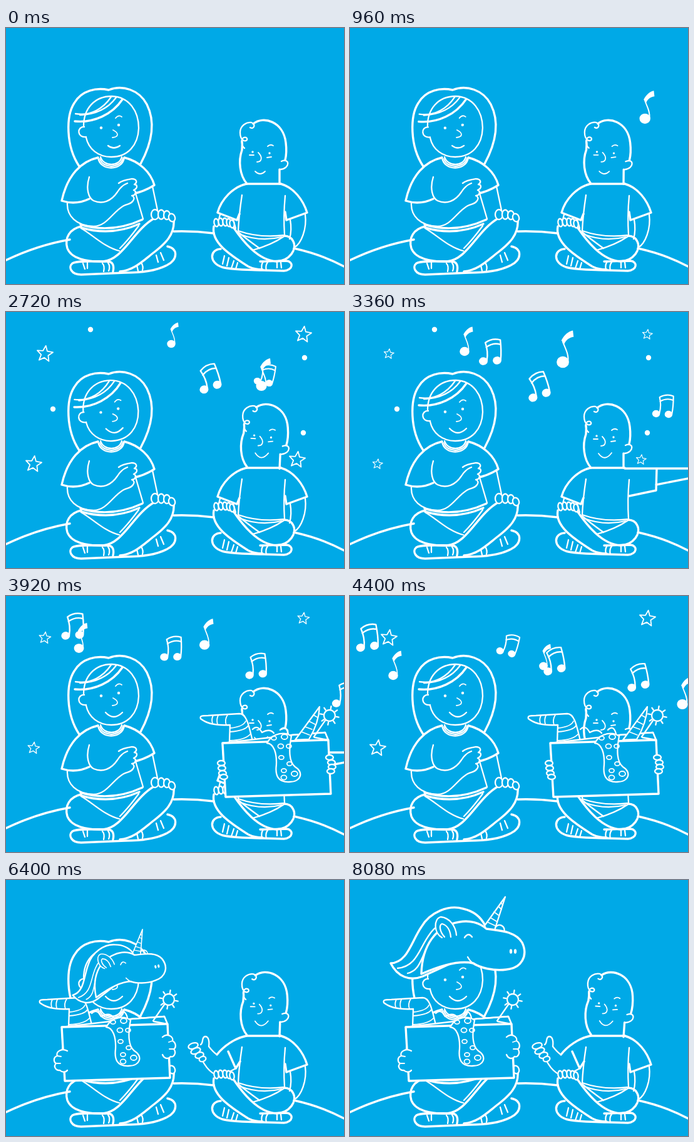
These frames come from a looping animation (540x409 px, 9600 ms). An HTML page:

```html
<!DOCTYPE html>
<html lang="en">
<head>
<meta charset="utf-8">
<title>Dress-up box</title>
<style>
html, body { margin: 0; width: 100%; height: 100%; overflow: hidden; background: #00a9e7; }
svg { display: block; width: 540px; height: 409px; fill: none; stroke: #fff; stroke-width: 2.3; stroke-linecap: round; stroke-linejoin: round; }
.w { stroke-width: 3.4; }
.t { stroke-width: 1.8; }
.s { fill: #fff; stroke: none; }
.b { fill: #00a9e7; }
</style>
</head>
<body>
<svg id="stage" viewBox="0 0 540 409"></svg>
<script>
const path = (d, c = '') => `<path class="${c}" d="${d}"/>`;
const oval = (x, y, rx, ry = rx, c = '', a = 0) =>
  `<ellipse class="${c}" cx="${x}" cy="${y}" rx="${rx}" ry="${ry}" transform="rotate(${a} ${x} ${y})"/>`;
const group = (id, ...parts) => `<g id="${id}">${parts.join('')}</g>`;

const ground = path('M0 371Q50 347 102 338M268 325Q300 324 332 328M460 352Q505 362 540 381', 'w');

const momBody = [
  path('M147 207C120 213 98 235 89 276C104 281 120 279 133 273M189 207C213 213 231 230 237 251Q223 260 207 264', 'w'),
  path('M147 207C150 229 186 229 189 207M151 206C156 222 181 222 185 206'),
  path('M150 209C155 225 182 225 187 208'),
  path('M133 238C127 257 132 272 140 276C154 282 168 277 178 262C183 254 188 250 194 248'),
  path('M98 280C97 300 112 316 140 317C162 316 170 294 188 284C196 280 199 282 203 276C206 272 204 269 201 268C208 267 209 261 204 259C211 256 210 250 205 250C211 246 208 241 201 241C194 242 186 243 180 248'),
  path('M234 253L242 291M207 264L219 305'),
  path('M119 314Q168 329 218 306M120 319Q168 333 213 313', 'w')
].join('');

const momLegs = [
  path('M120 317C102 321 93 335 98 352C104 368 128 374 155 373C188 370 203 323 237 304', 'w'),
  path('M120 320C138 330 158 351 181 356M212 316Q196 338 182 352'),
  path('M268 306C270 330 254 345 237 358C220 371 205 387 182 389', 'w'),
  path('M258 349C275 352 275 370 257 379C238 389 214 391 190 391L120 394C104 394 99 382 106 376C114 371 142 373 164 373Q174 375 171 389', 'w'),
  path('M123 376L126 385M130 375L130 384M154 376Q158 380 156 389M163 375Q167 381 164 388M209 379L211 388M216 375Q220 381 218 387M240 363L243 374M247 359L252 371'),
  oval(238, 298, 6, 8, 'b'), oval(248, 298, 5, 7.5, 'b'), oval(257, 299, 5, 7, 'b'), oval(265, 303, 5, 6.5, 'b', -20)
].join('');

const momHair = path('M117 221C95 188 96 140 109 120C121 99 145 95 164 99C186 90 213 99 225 122C239 150 234 182 215 217', 'w');

const momHead = group('momHead',
  path('M124 157C124 128 142 109 169 109C197 110 212 133 212 160C211 187 195 206 168 206C148 206 132 194 128 175'),
  path('M125 158C113 157 113 176 128 174'),
  group('bangs', path('M111 137C136 141 156 128 168 110M118 139C147 138 165 126 176 111'),
    path('M110 149C140 152 170 138 186 114', 'w')),
  path('M175 144Q180 138 185 142M171 163C181 168 180 174 170 175', 't'),
  group('momEyes', oval(152, 159.5, 2.2, 2.2, 's'), oval(180, 155, 2.2, 2.2, 's')),
  '<path id="momMouth"/>');

const kidHead = group('kidHead',
  path('M390 159C396 163 400 153 392 151C384 150 374 156 374 167C374 173 376 178 380 180C387 182 387 173 380 175C374 178 377 189 381 192'),
  path('M395 153C411 140 443 149 447 183Q449 199 446 211', 'w'),
  path('M440 213C453 207 455 224 438 226'),
  path('M437 226L437 249M377 181C378 187 377 190 377 195C371 212 373 235 385 249', 'w'),
  path('M418 189Q422 185 427 188M403 199C411 207 408 214 401 214M389 203L396 203M417 207L424 206', 't'),
  group('kidEyes', oval(394, 198, 1.7, 1.7, 's'), oval(421, 200, 1.7, 1.7, 's')),
  '<path id="kidMouth" class="t"/>');

const kidBody = path('M384 249L439 249', 'w') +
  path('M377 267Q372 300 371 324M446 268Q443 300 445 331M371 324Q405 336 445 331M375 330Q406 342 440 334');

const kidArms =
  group('leftDown', path('M384 249C363 254 344 273 338 295L369 307L373 297', 'w'), path('M342 298L340 306M363 306L367 320')) +
  group('rightDown', path('M439 249C460 255 475 275 481 295L448 307L446 294', 'w'),
    path('M478 298C481 320 472 345 460 351M454 306Q457 323 453 337')) +
  group('rightOut', path('M439 250L545 250M490 250L489 285L446 294M489 276L545 265', 'w')) +
  group('leftThumb',
    path('M384 249C365 253 347 266 337 279M355 274L367 301L374 290', 'w'),
    path('M337 279Q331 275 324 266C325 258 324 250 318 250C312 251 316 260 311 263M313 287C322 305 336 317 350 310L367 301'),
    oval(299, 265, 8, 4.5, 'b', -18), oval(303, 273, 8, 4.5, 'b', -22), oval(309, 280, 7, 4.5, 'b', -20), oval(314, 286, 5.5, 4, 'b', -20));

const kidLegs = [
  path('M332 317C327 342 357 362 387 381Q397 386 410 386M363 318C378 340 402 371 432 373C454 372 465 353 459 341C456 334 450 332 444 332', 'w'),
  path('M444 333C428 344 412 350 394 355M371 326Q384 337 405 352'),
  path('M343 353C325 354 324 375 345 382C363 387 388 386 410 387L444 388C459 387 460 373 448 372C436 372 424 373 406 373', 'w'),
  path('M349 364L346 377M356 367L353 380M364 372L360 384M370 375L367 385M411 373Q407 379 409 386M418 374Q414 380 416 387M433 375L433 383M439 374L440 383'),
  ...[[336, 311], [343, 310], [350, 310], [356, 311], [361, 313]].map(([x, y]) => oval(x, y, 3.6, 6.3, 'b', -8))
].join('');

// Box and its contents, placed on the woman's lap
const rays = Array.from({ length: 8 }, (_, i) => `<path d="M11 0L15 0" transform="rotate(${i * 45 + 10})"/>`).join('');
const sockDots = [[171, 227, 4], [188, 225, 5], [182, 240, 4.5], [195, 240, 4], [183, 258, 4], [196, 268, 4], [187, 279, 4], [187, 290, 4.5], [204, 284, 5]];
const box = group('box',
  path('M100 235L101 206C84 207 65 205 54 196C52 191 58 191 66 191L116 188C129 188 132 213 138 235Z', 'b'),
  path('M74 191Q71 197 73 203M82 191Q79 197 81 205M97 190Q92 198 95 206M101 211Q122 209 126 200M101 217Q126 215 130 207M101 231Q126 230 134 220', 't'),
  path('M89 235L200 222L253 218L258 230L262 316L94 321Z', 'b'),
  path('M137 213Q145 205 152 218Q165 211 171 219M181 214Q190 205 194 220M200 222L253 218L258 230L236 226'),
  group('boxHorn', path('M205 230L244 177Q243 203 227 229Z', 'b'), path('M215 217L228 222M221 209L232 213M227 200L237 205M234 190L241 194', 't')),
  path('M253 199L235 225'),
  `<g transform="translate(260 191)">${oval(0, 0, 9, 9, 'b')}${rays}</g>`,
  path('M89 235L258 230L262 316L94 321Z', 'b w'),
  path('M160 235C170 217 190 217 199 224C195 245 195 265 205 273C219 281 215 297 196 297C177 298 173 286 175 270C176 251 171 236 160 235Z', 'b'),
  `<g class="t">${sockDots.map(([x, y, r]) => oval(x, y, r, r * .8)).join('')}</g>`,
  group('momHands',
    path('M98 273C88 268 79 275 82 281C75 283 76 291 80 293C75 298 80 305 86 304C90 308 96 307 98 304', 'b'),
    path('M250 251C257 244 268 250 266 257C272 260 272 268 268 270C273 276 268 284 263 282C258 288 252 284 250 279', 'b'),
    path('M82 281L88 282M80 293L87 293M266 257L260 259M268 270L261 270', 't')),
  group('kidHands', ...[[87, 267], [88, 275], [89, 283], [91, 289], [260, 258], [263, 266], [264, 273], [262, 280]]
    .map(([x, y]) => oval(x, y, 6, 4, 'b'))));

const hat = group('hat',
  path('M65 133C92 132 98 98 114 75C128 51 158 39 181 46C199 50 210 61 216 73L190 120L116 154C96 162 76 155 65 133Z', 'b w'),
  path('M76 141C107 138 110 110 127 87Q133 78 141 73M92 149C110 145 113 128 122 110'),
  path('M215 73L248 27L231 80', 'b'),
  path('M219 67L232 73M224 60L234 66M230 51L237 56M237 42L242 47M241 36L244 40', 't'),
  path('M232 76C237 67 250 74 246 84C241 91 233 86 237 81'),
  path('M114 150C115 105 137 73 175 67C191 64 207 68 218 78C237 81 264 81 275 100C285 121 274 141 250 143C230 146 207 140 197 133C170 127 135 141 114 150Z', 'b w'),
  path('M147 92C134 85 133 62 145 59C159 60 169 74 170 88M151 91C143 82 142 72 147 70C155 72 160 80 161 91', 'b'),
  path('M183 92Q189 83 195 91M188 123Q193 132 201 136'),
  oval(257, 114, 2.2, 3.8, 's'), oval(264, 114, 2.2, 3.8, 's'));

const starPath = 'M' + Array.from({ length: 10 }, (_, i) => {
  const a = i * Math.PI / 5 - 1.45, r = i % 2 ? 5.8 : 13;
  return `${(r * Math.cos(a)).toFixed(1)} ${(r * Math.sin(a)).toFixed(1)}`;
}).join('L') + 'Z';
const starSpots = [[62, 67], [475, 36], [44, 243], [465, 236]];
const dotSpots = [[135, 28], [477, 73], [75, 155], [475, 193]];
const singleNote = oval(0, 0, 8.6, 8, 's') + path('M7 0C9 -10 3 -20 0 -28', 't') +
  path('M-2 -30C2 -38 8 -43 14 -44L15 -35C8 -34 4 -30 2 -25Z', 's');
const pairNote = oval(-10.5, 0, 6.6, 6, 's') + oval(10.5, 0, 6.6, 6, 's') +
  path('M-5 -1Q-2 -14 -6 -28Q5 -35 17 -31Q18 -14 16 -1M-5 -21Q6 -28 17 -24');

// Each stop: time, x, y, size, turn
const notes = [
  [singleNote, [[320, 552, 180, 1, 0], [1600, 392, 110, 1, 0], [2720, 264, 51, .78, 0], [3360, 183, 63, .9, 0], [4400, 69, 127, .9, 0], [5040, 51, 311, .78, 0], [5360, 49, 345, .3, 0]]],
  [pairNote, [[1040, 565, 190, .9, 8], [1600, 494, 161, .93, 8], [2720, 327, 120, 1.07, -20], [3360, 224, 78, 1.05, -3], [4400, 28, 81, 1.07, -8], [5040, 68, 249, 1.05, -20], [5360, 75, 290, .3, -20]]],
  [singleNote, [[1280, 565, 200, 1, 0], [1600, 528, 182, 1, 0], [2720, 408, 118, 1, 0], [3360, 340, 80, 1.15, 0], [4400, 309, 112, .8, 0], [5040, 322, 312, 1, 0], [5360, 325, 350, .3, 0]]],
  [pairNote, [[1760, 565, 175, .9, 10], [2720, 411, 112, .9, 10], [3360, 303, 133, 1.08, -20], [4400, 249, 90, .92, 14], [5040, 280, 256, 1, -15], [5360, 290, 300, .3, -15]]],
  [pairNote, [[2960, 565, 185, .9, 5], [3360, 499, 163, .95, 3], [4400, 327, 118, 1.05, -13], [5040, 302, 247, 1, -12], [5360, 300, 300, .3, -12]]],
  [pairNote, [[3760, 565, 185, 1, 5], [4400, 461, 144, 1.05, -13], [4960, 390, 235, .3, -13]]],
  [singleNote, [[4160, 560, 185, 1, 0], [4400, 531, 173, 1, 0], [5040, 496, 288, .7, 0], [5360, 490, 330, .3, 0]]]
];

document.getElementById('stage').innerHTML = [
  ground,
  group('stars', ...starSpots.map(() => path(starPath, 't'))),
  group('dots', ...dotSpots.map(() => oval(0, 0, 4.2, 4.2, 's'))),
  group('notes', ...notes.map(([shape]) => `<g>${shape}</g>`)),
  momHair, momBody, momLegs, momHead, kidBody, kidArms, kidLegs, kidHead, box, hat
].join('');

const el = {};
document.querySelectorAll('[id]').forEach(e => el[e.id] = e);
const show = (e, on) => e.style.display = on ? '' : 'none';
const move = (e, v) => e.setAttribute('transform', v);
const clamp = v => Math.max(0, Math.min(1, v));
const span = (t, a, b) => clamp((t - a) / (b - a));
const ease = p => p * p * (3 - 2 * p);

// Smooth curve through unevenly timed stops
function along(stops, t) {
  let i = 0;
  while (i < stops.length - 2 && t > stops[i + 1][0]) i++;
  const a = stops[i], b = stops[i + 1], d = b[0] - a[0], p = (t - a[0]) / d;
  const slope = (j, k) => {
    const u = stops[Math.max(0, j - 1)], v = stops[Math.min(stops.length - 1, j + 1)];
    return (v[k] - u[k]) / (v[0] - u[0]) * d;
  };
  const q = p * p, c = q * p;
  return [1, 2, 3, 4].map(k => a[k] * (2 * c - 3 * q + 1) + b[k] * (3 * q - 2 * c) +
    slope(i, k) * (c - 2 * q + p) + slope(i + 1, k) * (c - q));
}

function place(list, spots, scale, on) {
  show(list, on);
  spots.forEach(([x, y], i) => move(list.children[i], `translate(${x} ${y}) scale(${scale})`));
}

function blink(e, y, shut) {
  move(e, `translate(0 ${y}) scale(1 ${shut}) translate(0 ${-y})`);
}

function draw(t) {
  notes.forEach(([, stops], i) => {
    const e = el.notes.children[i], on = t >= stops[0][0] && t < stops[stops.length - 1][0];
    show(e, on);
    if (!on) return;
    const [x, y, s, r] = along(stops, t);
    move(e, `translate(${x} ${y}) rotate(${r}) scale(${s})`);
  });

  const pulse = .8 + .22 * Math.cos((t - 1040) / 1680 * 2 * Math.PI);
  place(el.stars, starSpots, pulse, t >= 1120 && t < 4960);
  place(el.dots, dotSpots, Math.min(span(t, 2080, 2320), 1 - span(t, 3680, 3920)), t > 2080 && t < 3920);

  const sway = t < 3360 ? (1 - Math.cos(t / 1120 * 2 * Math.PI)) / 2 : 0;
  const lean = t < 3360 ? 3 * sway : 4 * ease(span(t, 6160, 6640));
  move(el.momHead, `translate(${1.5 * sway} 0) rotate(${-3 * sway} 168 200)`);
  move(el.kidHead, `rotate(${lean} 412 250)`);

  const smile = span(t, 1600, 2720);
  el.momMouth.setAttribute('d', `M${163 - 4 * smile} ${188 - 2 * smile}Q172 ${195 + 5 * smile} ${182 + 4 * smile} ${188 - 2 * smile}`);
  el.kidMouth.setAttribute('d', `M${398 - smile} ${229 - 3 * smile}Q${406 + smile} ${237 + 3 * smile} ${414 + 4 * smile} ${229 - 4 * smile}`);

  const beat = [5760, 7680].some(s => t >= s && t < s + 160);
  blink(el.momEyes, 158, beat ? .3 : 1);
  blink(el.kidEyes, 199, beat ? .3 : 1);

  const shift = 480 - 249 * ease(span(t, 3600, 4000)) - 231 * ease(span(t, 4560, 4880));
  show(el.box, t >= 3600);
  move(el.box, `translate(${shift} 0)`);
  show(el.kidHands, t < 4720);
  show(el.momHands, t >= 4800);
  show(el.boxHorn, t < 6160);

  const holding = t >= 4000 && t < 4720;
  show(el.leftDown, !holding && t < 4880);
  show(el.leftThumb, t >= 4880);
  show(el.rightOut, t >= 3280 && t < 4000);
  show(el.rightDown, t < 3280 || t >= 4720);

  const rise = ease(span(t, 6080, 6640));
  show(el.hat, t >= 6160);
  show(el.bangs, t < 6400);
  move(el.hat, `translate(${30 * (1 - rise)} ${80 * (1 - rise)}) rotate(${-14 * Math.sin(rise * Math.PI)} 170 140) translate(170 140) scale(${.3 + .7 * rise}) translate(-170 -140)`);
}

const start = performance.now();
function tick() {
  const t = (performance.now() - start) % 9600;
  draw(Math.floor(t / 80) * 80);
  requestAnimationFrame(tick);
}
tick();
</script>
</body>
</html>
```
